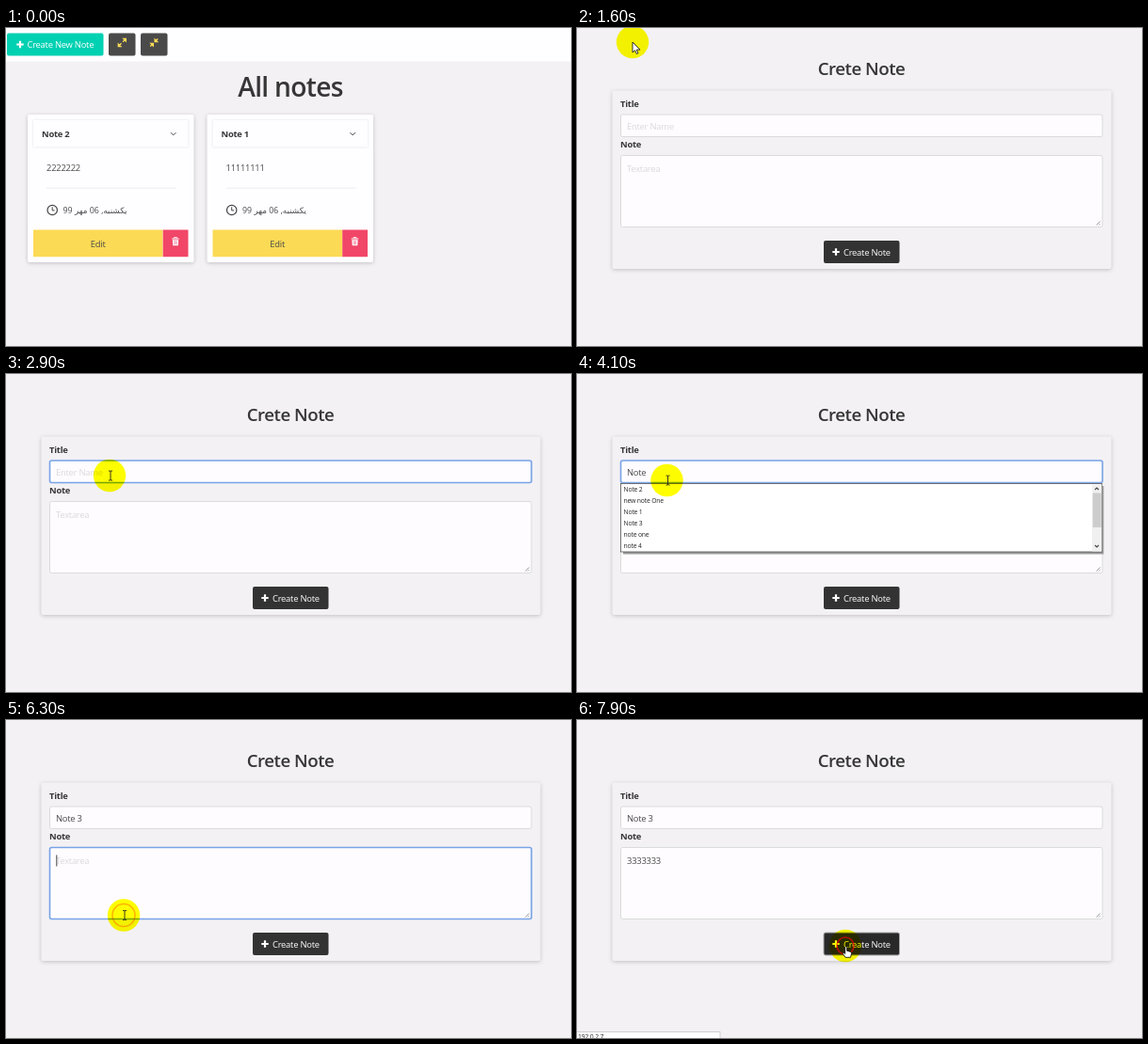
Recreate the animation shown at these times as an HTML page. Size 600x338 px, loop 8 s.

```html
<!DOCTYPE html>
<html lang="en">
<head>
<meta charset="utf-8">
<title>Notes</title>
<style>
  html, body { margin: 0; width: 100%; height: 100%; overflow: hidden; background: #f3f1f4; }
  svg { display: block; }
  text { font: 9.4px "Open Sans", "Noto Sans", sans-serif; letter-spacing: -.025em; fill: #4a4a4a; white-space: pre; }
  .bold { font-weight: 700; fill: #363636; }
  .mid { text-anchor: middle; }
  .head { font-weight: 600; fill: #363636; text-anchor: middle; }
  .light { fill: #fff; }
  .hint { fill: #dcd9dd; }
  .small { font-size: 6.8px; fill: #222; }
  .date { font-family: "Open Sans", "DejaVu Sans", sans-serif; font-size: 8.8px; letter-spacing: 0; direction: rtl; }
  .card { filter: drop-shadow(0 1px 2px #0003); }
  .bar { filter: drop-shadow(0 .5px 1px #0002); }
  .field { fill: #fefcfe; stroke: #dbdbdb; }
  #halo { fill: #ff0; mix-blend-mode: multiply; }
</style>
</head>
<body>
<svg width="600" height="338" viewBox="0 0 600 338">
  <defs>
    <path id="plus" d="M-3.7 0H3.7M0-3.7V3.7" stroke="#fff" stroke-width="2.2"/>
  </defs>
  <rect width="600" height="338" fill="#f3f1f4"/>

  <g id="home">
    <rect width="600" height="35.5" fill="#fefdff"/>
    <rect id="add" x="1" y="5.5" width="102.5" height="24" rx="2"/>
    <use href="#plus" x="15" y="17.5"/>
    <text class="light" x="22.5" y="21.3">Create New Note</text>
    <rect x="109" y="5.5" width="28.5" height="24" rx="2" fill="#4a4a4a"/>
    <rect x="143" y="5.5" width="28.5" height="24" rx="2" fill="#4a4a4a"/>
    <g fill="#ffdd57" stroke="#ffdd57" stroke-width="1.3">
      <path transform="translate(123.3 15.5)" d="M.8-.8 3-3M-.8.8-3 3M4-4v2.5L1.5-4zM-4 4v-2.5L-1.5 4z"/>
      <path transform="translate(157.2 15.5)" d="M2-2 4-4M-2 2-4 4M.9-.9v-2.5L3.4-.9zM-.9.9v2.5L-3.4.9z"/>
    </g>
    <text class="head" x="302" y="73" style="font-size:28.2px">All notes</text>
    <g id="cards"></g>
  </g>

  <g id="form">
    <text class="head" x="302" y="49.5" style="font-size:18.7px">Crete Note</text>
    <rect class="card" x="37.5" y="66.5" width="530" height="189.5" rx="2" fill="#f3f1f4"/>
    <text class="bold" x="46" y="84">Title</text>
    <text class="bold" x="46" y="127.3">Note</text>
    <rect id="titleBox" class="field" x="46.5" y="92" width="511.5" height="23.5" rx="2"/>
    <rect id="noteBox" class="field" x="46.5" y="135.5" width="511.5" height="76" rx="2"/>
    <path d="M551.5 209.5l4-4M554 209.5l1.5-1.5" stroke="#888" stroke-width=".8"/>
    <text id="titleHint" class="hint" x="53" y="108">Enter Name</text>
    <text id="noteHint" class="hint" x="53" y="153.3">Textarea</text>
    <text id="titleText" x="53" y="108"></text>
    <text id="noteText" x="53" y="153.3"></text>
    <rect id="caret" width="1" height="12" fill="#444"/>
    <rect id="save" x="262" y="226" width="80.5" height="24" rx="2"/>
    <use href="#plus" x="275" y="238"/>
    <text class="light" x="283" y="242">Create Note</text>
    <g id="list"></g>
  </g>

  <g id="status">
    <rect id="statusBox" x="-1" y="331.5" height="9" fill="#fff" stroke="#d0d0d0"/>
    <text id="statusText" class="small" x="1" y="339"></text>
  </g>

  <g id="pointer">
    <circle id="halo" r="17.2"/>
    <circle id="ring" fill="none" stroke="#f00" stroke-width="1.6"/>
    <path id="arrow" d="M0 0v11l2.6-2.3 1.7 3.8 1.7-.8-1.7-3.6H8z" fill="#fff" stroke="#000" stroke-width=".8"/>
    <path id="beam" d="M-1-5h1.2q.8 0 .8.8v8.4q0 .8-.8.8H-1M3-5H1.8Q1-5 1-4.2M1 4.2Q1 5 1.8 5H3" fill="none" stroke="#222" stroke-width=".9"/>
    <path id="hand" d="M-.3 1.3q1-1.2 2 0v4l4.2 1.2q.8.4.6 1.8l-1 4H0L-2.6 8.4q-.2-1.4 1-1l1.3 1z" fill="#fff" stroke="#000" stroke-width=".8"/>
  </g>
</svg>
<script>
const $ = id => document.getElementById(id);
const show = (id, on) => $(id).style.display = on ? '' : 'none';
const set = (id, attrs) => { for (const k in attrs) $(id).setAttribute(k, attrs[k]); };

const card = (x, title, body) => `<g transform="translate(${x})">
  <rect class="card" y="92" width="176.5" height="157" rx="2" fill="#fefdff"/>
  <rect class="bar" x="6" y="98" width="164.5" height="28.5" fill="#fefdff"/>
  <text class="bold" x="15" y="116.3">${title}</text>
  <path d="M152 111.2l2.7 2.7 2.7-2.7" fill="none" stroke="#444"/>
  <text x="20" y="152.3">${body}</text>
  <path d="M20 170.2h138" stroke="#eeecef"/>
  <circle cx="26.2" cy="193.5" r="5.2" fill="none" stroke="#444" stroke-width="1.2"/>
  <path d="M26.2 190.3v3.6h2.4" fill="none" stroke="#444"/>
  <text class="date" x="105.5" y="196.7">یکشنبه, 06 مهر 99</text>
  <rect x="6" y="214.5" width="137.5" height="28.7" fill="#fbda55"/>
  <text class="mid" x="74.7" y="232.8">Edit</text>
  <rect x="143.7" y="214.5" width="26.8" height="28.7" fill="#f14668"/>
  <path d="M153.2 224h7.6M155.5 223.5v-.8h3v.8" fill="none" stroke="#fff"/>
  <path d="M153.8 225.2h6.4l-.4 6h-5.6z" fill="#fff"/>
  <path d="M155.8 226.2v4M157 226.2v4M158.2 226.2v4" stroke="#f14668" stroke-width=".5"/>
</g>`;
$('cards').innerHTML = card(23, 'Note 2', '2222222') + card(213.5, 'Note 1', '11111111');

const scrollbar = `<path d="M547 117.5h10.3v71H547z" fill="#f0f0f0"/>
  <path d="M547.7 126.5h9v36.5h-9z" fill="#cdcdcd"/>
  <path d="M550 123l2-2 2 2M550 182l2 2 2-2" fill="none" stroke="#444" stroke-width="1.1"/>`;
function fillList(rows) {
  const h = rows.length * 12 + .5;
  $('list').innerHTML = `<rect x="49" y="119" width="510.3" height="${h}" fill="#999"/>
    <rect x="46.5" y="116.5" width="511" height="${h}" fill="#fff" stroke="#555" stroke-width=".8"/>` +
    rows.map((r, i) => `<text class="small" x="49.5" y="${125.2 + i * 12}">${r}</text>`).join('') +
    (rows.length > 1 ? scrollbar : '');
}
const allRows = ['Note 2', 'new note One', 'Note 1', 'Note 3', 'note one', 'note 4'];

// Pointer path: time, x, y
const path = [[300, 528, 320], [1000, 59, 15], [1600, 59, 15], [2050, 97, 100], [2100, 97, 100],
  [2400, 104, 112], [2900, 110, 108], [3000, 102, 113], [3400, 102, 113], [3900, 95.5, 113],
  [5300, 95.5, 113], [5600, 173.5, 112], [6100, 125, 207.5], [6400, 125, 207.5],
  [7100, 180, 238], [7600, 285, 240], [8000, 285, 240]];
function pointerAt(t) {
  const i = Math.max(1, path.findIndex(p => p[0] > t));
  const [t0, x0, y0] = path[i - 1], [t1, x1, y1] = path[i];
  const u = (t - t0) / (t1 - t0), e = u * u * (3 - 2 * u);
  return [x0 + (x1 - x0) * e, y0 + (y1 - y0) * e];
}

const clicks = [1200, 2400, 6100, 7800];
const titleKeys = [3400, 3500, 3600, 3600, 4700, 5000];
const noteKeys = [6500, 6600, 6700, 6800, 6900, 7000, 7100];
const resets = [2400, 6100, ...titleKeys, ...noteKeys];
const typed = (word, keys, t) => word.slice(0, keys.filter(k => k <= t).length);

function draw(t) {
  const onForm = t >= 1500;
  const [x, y] = pointerAt(t);
  const within = (x0, y0, x1, y1) => t >= 300 && x >= x0 && x <= x1 && y >= y0 && y <= y1;
  const overAdd = !onForm && within(1, 5, 103, 29);
  const overSave = onForm && within(262, 226, 342, 250);
  const overTitle = onForm && within(46, 92, 558, 116);
  const overNote = onForm && within(46, 135, 558, 212);

  show('home', !onForm);
  show('form', onForm);
  set('add', { fill: overAdd ? '#00bfa3' : '#00d1b2' });

  const focus = t < 2400 ? '' : t < 6100 ? 'title' : t < 7800 ? 'note' : 'save';
  const border = (id, focused, over) => set(id, {
    style: focused ? 'stroke:#77a3e6;stroke-width:1.6' : over ? 'stroke:#b5b5b5' : ''
  });
  border('titleBox', focus === 'title', overTitle);
  border('noteBox', focus === 'note', overNote);
  set('save', {
    fill: overSave ? '#292929' : '#333',
    stroke: focus === 'save' ? '#aaa' : 'none'
  });

  const title = typed('Note 3', titleKeys, t), note = typed('3333333', noteKeys, t);
  $('titleText').textContent = title;
  $('noteText').textContent = note;
  show('titleHint', !title);
  show('noteHint', !note);

  const last = Math.max(...resets.filter(r => r <= t));
  const inField = focus === 'title' || focus === 'note';
  const caretOn = inField && Math.floor((t - last) / 500) % 2 === 0;
  show('caret', caretOn);
  if (caretOn) set('caret', {
    x: 53.3 + $(focus + 'Text').getComputedTextLength(),
    y: focus === 'title' ? 98 : 143.5
  });

  const listOpen = t >= 3500 && t < 6100;
  show('list', listOpen);
  if (listOpen) fillList(t < 5000 ? allRows : ['Note 3']);

  const sending = t >= 7800;
  show('status', overAdd || sending);
  set('statusBox', { width: sending ? 153 : 68 });
  $('statusText').textContent = sending ? '192.0.2.7' : '192.0.2.7:8000/create';

  show('pointer', t >= 300);
  const shape = overAdd || overSave ? 'hand' : overTitle || overNote ? 'beam' : 'arrow';
  for (const s of ['hand', 'beam', 'arrow']) {
    show(s, s === shape);
    set(s, { transform: `translate(${x} ${y})` });
  }
  const age = t - Math.max(...clicks.filter(c => c <= t));
  for (const id of ['halo', 'ring']) set(id, { cx: x, cy: y });
  show('ring', age < 280);
  if (age < 280) set('ring', { r: 6 + age * .03, opacity: 1 - age / 280 });
}

function tick() {
  draw(Math.floor(performance.now() % 8000 / 100) * 100);
  requestAnimationFrame(tick);
}
tick();
</script>
</body>
</html>
```
